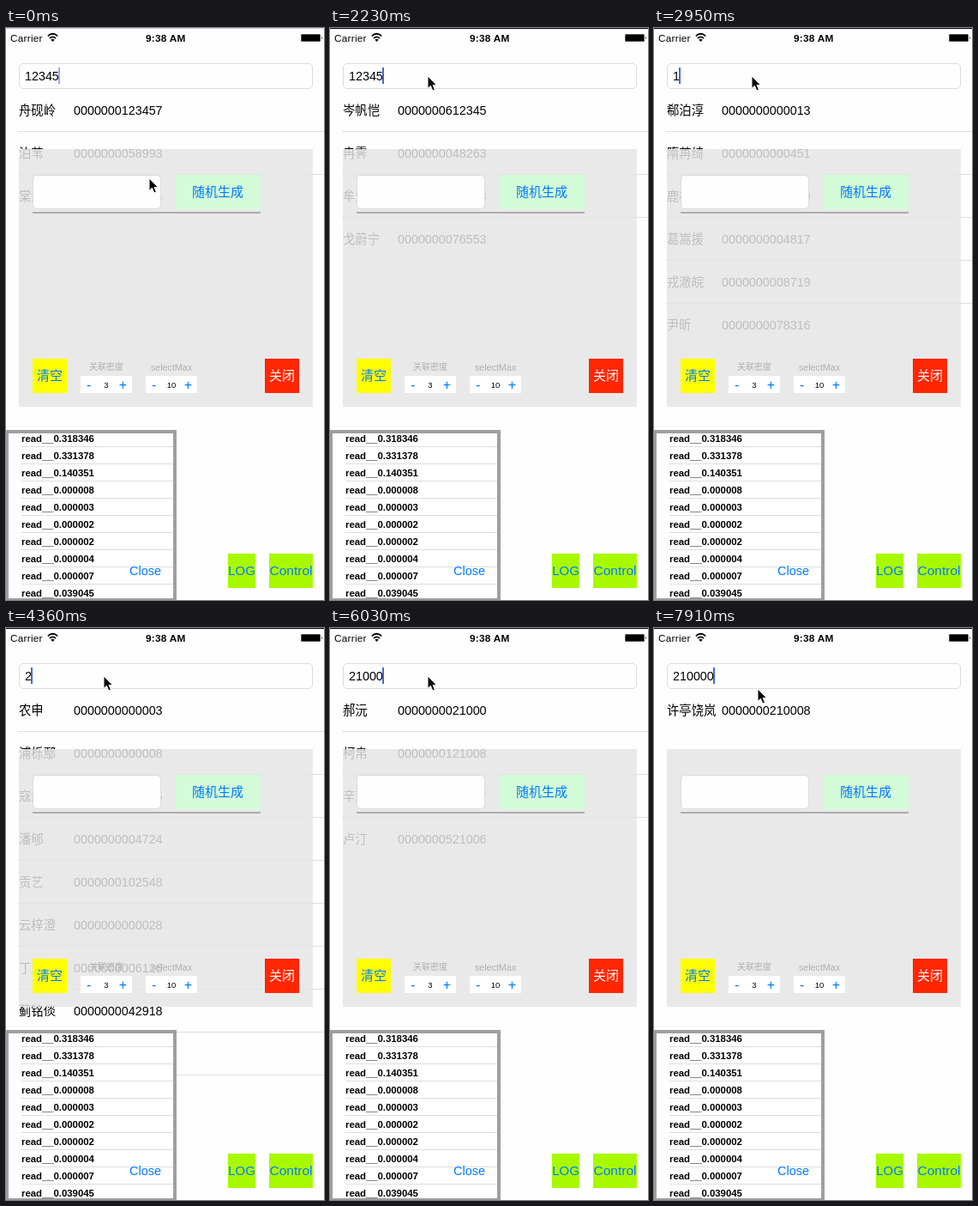
An HTML page for the animation above (8000 ms loop, 371 by 666 pixels).

```html
<!DOCTYPE html>
<html lang="zh">
<head>
<meta charset="utf-8">
<title>Number search</title>
<style>
html, body { margin: 0; width: 100%; height: 100%; overflow: hidden; background: #fff; }
#stage {
  position: absolute; left: 0; top: 0; width: 371px; height: 666px; overflow: hidden;
  background: #fefefe; color: #000; white-space: pre;
  font: 14.34px "Liberation Sans", "Noto Sans CJK SC", "Noto Sans CJK", sans-serif;
}
#stage *, #stage { box-sizing: border-box; }
#stage div, #stage span, #stage svg { position: absolute; }
#edge { left: 0; top: 0; width: 371px; height: 1px; }
.status { position: absolute; top: 4px; line-height: 16px; font-size: 11.8px; letter-spacing: .25px; }
.field { background: #fefefe; border: 1px solid #dcdcdc; border-radius: 5px; }
#query { left: 15px; top: 41px; width: 343px; height: 30px; line-height: 28px; padding-left: 6px; }
#caret { top: 46px; width: 2px; height: 19px; background: #4169e0; }
#list { left: 0; top: 71px; }
.row { left: 0; width: 371px; height: 50px; line-height: 50px; }
.row span:first-child { left: 15px; }
.row span:last-child { left: 79px; }
.row + .row::before {
  content: ""; position: absolute; left: 14px; right: 0; top: -1px; height: 1px; background: #dedede;
}
#panel { left: 15px; top: 141px; width: 343px; height: 300px; background: rgba(229, 229, 229, .83); }
.btn { text-align: center; color: #007aff; height: 40px; line-height: 40px; font-size: 15px; }
.label { top: 246px; width: 60px; line-height: 16px; text-align: center; color: #b0b0b0; font-size: 10px; }
.stepper {
  top: 264px; width: 60px; height: 20px; line-height: 21px; background: #fff;
  text-align: center; font-size: 9.5px;
}
.stepper::before, .stepper::after { position: absolute; top: 0; color: #007aff; font-size: 16px; }
.stepper::before { content: "-"; left: 7px; }
.stepper::after { content: "+"; right: 6px; }
.lime { top: 612px; background: #a8f900; }
#log {
  left: 0; top: 468px; width: 199px; height: 198px; overflow: hidden; background: #fff;
  border: 4px solid #9f9f9f; border-left-width: 3px; border-bottom-width: 2px;
}
#log div {
  left: 15px; right: 0; height: 20px; line-height: 20px; border-bottom: 1px solid #dedede;
  font-size: 11.4px; font-weight: bold;
}
#log small { font-size: 8px; font-weight: normal; }
#pointer { left: 0; top: 0; }
</style>
</head>
<body>
<div id="stage">
  <div id="edge"></div>
  <span class="status" style="left:5px">Carrier</span>
  <svg style="left:48px;top:5px" width="13" height="12" fill="none" stroke="#000" stroke-width="1.8">
    <path d="M.8 4.4Q6.5-.8 12.2 4.4M3 7Q6.5 3.8 10 7"/>
    <path d="M6.5 11 4.4 8.7Q6.5 7 8.6 8.7Z" fill="#000" stroke="none"/>
  </svg>
  <b class="status" style="left:163px">9:38 AM</b>
  <svg style="left:343px;top:6px" width="27" height="11">
    <rect x="1" y="1" width="23" height="9" rx="1.5" fill="#555"/>
    <rect x="2" y="2" width="21" height="7"/>
    <path d="M25 3.7q1.8 1.8 0 3.6z"/>
  </svg>
  <div id="query" class="field"></div>
  <div id="caret"></div>
  <div id="list"></div>
  <div id="panel">
    <div class="field" style="left:16px;top:30px;width:150px;height:40px"></div>
    <div class="btn" style="left:182px;top:30px;width:100px;background:#d3fbd7">随机生成</div>
    <div style="left:16px;top:73px;width:266px;height:2px;background:#adadad"></div>
    <div class="btn" style="left:16px;top:244px;width:40px;background:#ff0">清空</div>
    <div class="label" style="left:72px">关联密度</div>
    <div class="stepper" style="left:72px">3</div>
    <div class="label" style="left:148px;font-size:10.7px">selectMax</div>
    <div class="stepper" style="left:148px">10</div>
    <div class="btn" style="left:287px;top:244px;width:40px;background:#ff2600;color:#fff">关闭</div>
  </div>
  <div id="log"></div>
  <span class="btn" style="left:144px;top:612px;font-size:14.5px">Close</span>
  <div class="btn lime" style="left:259px;width:32px">LOG</div>
  <div class="btn lime" style="left:307px;width:51px;font-size:15.5px">Control</div>
  <svg id="pointer" width="15" height="21">
    <path d="M1 1V15.4L4.4 12.3 6.8 18 9.4 16.9 7 11.4H11.4Z" stroke="#fff" stroke-linejoin="round"/>
  </svg>
</div>
<script>
const $ = id => document.getElementById(id);
const LOOP = 8000;

const typed = [[0, '12345'], [2350, '1234'], [2470, '123'], [2710, '12'], [2950, '1'], [3060, ''],
  [4130, '2'], [4720, '21'], [5190, '210'], [5550, '2100'], [5910, '21000'], [6620, '210000']];

const results = [
  [0, '舟砚岭 123457,泊苇 58993,棠溪 61234'],
  [2110, '岑帆恺 612345,冉霁 48263,牟汀 71248,戈蔚宁 76553'],
  [2470, '岑帆恺 1236,冉霁 48263,牟汀 71248,戈蔚宁 76553'],
  [2710, '阮棋沐 128,柏言舒 512,池砚 1247,苗澍 6120,祁岚舟 12408,舒朗 31277,骆清禾 41206,温屿 51284,邬芷 61239,桑陌 71212'],
  [2950, '郗泊淳 13,隋苒绮 451,鹿栩 1819,葛嵩援 4817,戎澈皖 8719,尹昕 78316'],
  [3060, '季禾 8,淳于枫 7,宁芷 35,蒲邑 4714,卓苓 103561,元弛筠 29,方穗 6185,蔺钰倬 45816,桑陌 812,邬芷 947'],
  [4360, '农申 3,浦栎鄢 8,寇绪 26,潘郇 4724,贡艺 102548,云梓澄 28,丁沅 6126,蓟铭倓 42918,桑陌 812,邬芷 927'],
  [4720, '贺芃 21,沈栎 218,寇绪 2126,潘郇 4721,贡艺 102148,元弛筠 821,丁沅 6217,蓟铭倓 42191,桑陌 2182,邬芷 9217'],
  [5310, '鲍绮芳 5210,柯帛 786'],
  [5550, '郝沅 2100'],
  [6030, '郝沅 21000,柯帛 121008,辛芃 210047,卢汀 521006'],
  [6850, '许亭饶岚 210008']
];

const blink = [[0, .55], [120, 0], [470, .35], [590, .7], [710, 1], [940, .6], [1060, .25], [1180, 0],
  [1420, .5], [1540, 1], [3660, .4], [3770, 0], [4130, 1], [7440, .4], [7550, 0], [7790, .5], [7910, 1]];

const pointer = [[0, 166, 174], [940, 163, 150], [1060, 152, 92], [1180, 140, 37], [1420, 130, 8],
  [1650, 122, 24], [1880, 113, 55], [6270, 115, 59], [6390, 118, 67], [6510, 119, 70], [7210, 120, 70]];

// Latest entry whose start time has passed.
const at = (track, t) => track.findLast(step => step[0] <= t);

function showRows(rows) {
  $('list').innerHTML = rows.split(',').map((row, i) => {
    const [name, number] = row.split(' ');
    return `<div class="row" style="top:${50 * i}px">` +
      `<span>${name}</span><span>${number.padStart(13, '0')}</span></div>`;
  }).join('');
}

const reads = [318346, 331378, 140351, 8, 3, 2, 2, 4, 7, 39045];
$('log').innerHTML = reads.map((n, i) =>
  `<div style="top:${-4 + 20 * i}px">read<small>___</small>0.${String(n).padStart(6, '0')}</div>`).join('');

let shown;
function draw(now) {
  const t = now % LOOP;
  const text = at(typed, t)[1];
  const rows = at(results, t)[1];
  const [, x, y] = at(pointer, t);
  if (rows !== shown) showRows(shown = rows);
  $('query').textContent = text;
  $('caret').style.left = Math.max(22, 21 + 8 * text.length) + 'px';
  $('caret').style.opacity = at(blink, t)[1];
  $('edge').style.background = t < 1540 ? '#d0d0d0' : '#000';
  $('pointer').style.transform = `translate(${x}px, ${y}px)`;
}

function tick() {
  draw(performance.now());
  requestAnimationFrame(tick);
}
tick();
</script>
</body>
</html>
```
